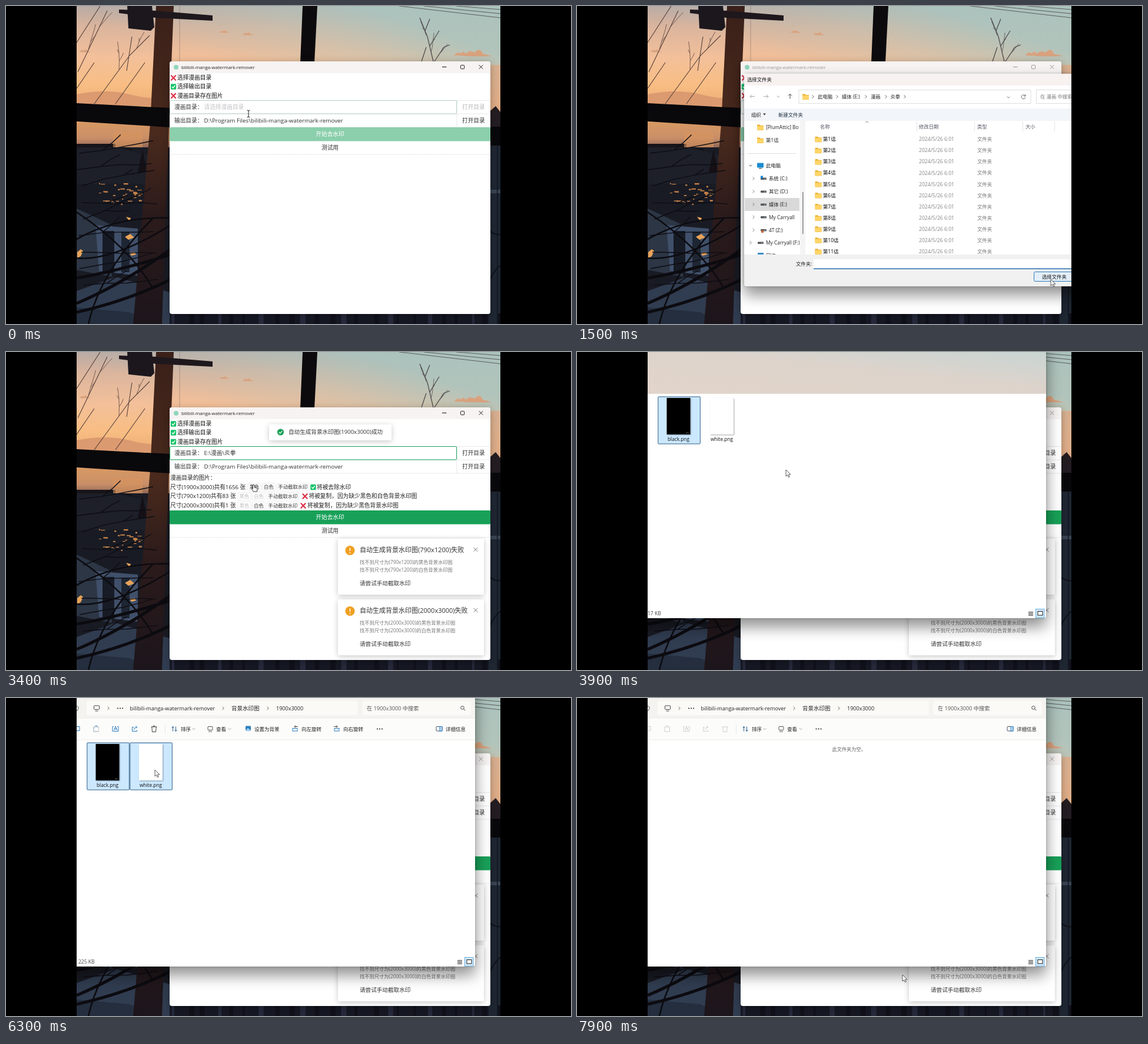
Recreate the animation shown at these times as an HTML page. Size 960 px wide and 540 px high, loop 8000 ms.

```html
<!DOCTYPE html>
<html lang="zh-CN">
<head>
<meta charset="utf-8">
<style>
html,body{margin:0;width:100%;height:100%;overflow:hidden;background:#000}
svg{display:block;width:960px;height:540px}
text{font-family:"Open Sans","Noto Sans CJK SC","Noto Sans CJK",sans-serif;white-space:pre}
.win{filter:drop-shadow(0 3px 7px rgba(0,0,0,.3))}
.pop{filter:drop-shadow(0 14px 13px rgba(0,0,0,.38)) drop-shadow(0 0 2px rgba(0,0,0,.25))}
.toast{filter:drop-shadow(0 2px 5px rgba(0,0,0,.22))}
</style>
</head>
<body>
<svg id="stage" viewBox="0 0 960 540"></svg>
<script>
const stage = document.getElementById('stage');
const PROJECT = 'bilibili-manga-watermark-remover';
const GREEN = '#18a058', BLUE = '#2b7cc0';

let seed = 11;
const rnd = () => (seed = (seed * 16807) % 2147483647) / 2147483647;
const range = (n, fn) => Array.from({ length: n }, (_, i) => fn(i)).join('');

// y is the vertical middle of the line
const text = (x, y, s, size = 9.7, fill = '#333', more = '') =>
  `<text x="${x}" y="${y + size * .36}" font-size="${size}" fill="${fill}" ${more}>${s}</text>`;
const mid = 'text-anchor="middle"';
const rect = (x, y, w, h, fill, more = '') =>
  `<rect x="${x}" y="${y}" width="${w}" height="${h}" fill="${fill}" ${more}/>`;
const line = (d, color, width = 1, more = '') =>
  `<path d="${d}" fill="none" stroke="${color}" stroke-width="${width}" ${more}/>`;
const shape = (d, fill, more = '') => `<path d="${d}" fill="${fill}" ${more}/>`;
const dot = (x, y, r, fill) => `<circle cx="${x}" cy="${y}" r="${r}" fill="${fill}"/>`;
const group = (id, body) => `<g id="${id}">${body}</g>`;
const gradient = (id, dir, stops) => `<linearGradient id="${id}" ${dir}>${stops.map(([o, c, a = 1]) =>
  `<stop offset="${o}" stop-color="${c}" stop-opacity="${a}"/>`).join('')}</linearGradient>`;
const down = 'x1="0" y1="0" x2="0" y2="1"';

const cross = (x, y) => line(`M${x - 3.6} ${y - 3.8}l7.2 7.6m0-7.6l-7.2 7.6`, '#dd2e44', 2.1, 'stroke-linecap="round"');
const tick = (x, y) => rect(x - 4.7, y - 4.7, 9.4, 9.4, '#16c46a', 'rx="1.5"') +
  line(`M${x - 2.6} ${y}l2 2.2 3.4-4.4`, '#fff', 1.4);
const chevron = (x, y, c = '#555') => line(`M${x - 1.5} ${y - 2.6}l2.8 2.6-2.8 2.6`, c, .9);
const caret = (x, y, c = '#666') => line(`M${x - 2.4} ${y - 1.2}l2.4 2.4 2.4-2.4`, c, .9);
const closeMark = (x, y, c) => line(`M${x - 3.3} ${y - 3.3}l6.6 6.6m0-6.6l-6.6 6.6`, c, 1);
const folder = (x, y) => shape(`M${x} ${y - 4.5}h4.5l1.5 1.5h5v8h-11z`, '#e9b53a') +
  rect(x, y - 2, 11, 6.5, '#ffd567', 'rx=".8"');

function twig(x, y, angle, len, depth) {
  if (!depth) return '';
  const bend = angle + (rnd() - .5) * .25;
  const x2 = x + Math.cos(bend) * len, y2 = y + Math.sin(bend) * len;
  return `M${x.toFixed(1)} ${y.toFixed(1)}L${x2.toFixed(1)} ${y2.toFixed(1)}` +
    twig(x2, y2, bend, len * .85, depth - 1) +
    (rnd() < .6 ? twig(x2, y2, bend + (rnd() < .5 ? -.45 : .45), len * .55, depth - 2 > 0 ? depth - 2 : 0) : '');
}
const twigs = list => list.map(a => twig(...a)).join('');

function wallpaper() {
  const cloud = (x, y, s) => shape(`M${x - 11 * s} ${y}q${4 * s} ${-6 * s} ${9 * s} ${-3 * s}q${5 * s} ${-5 * s} ${7 * s} ${s}l${8 * s} ${2 * s}q${-10 * s} 1 ${-24 * s} 0z`, '#d9a27e');
  const lamps = range(34, () => rect(158 + rnd() * 68, 300 + rnd() * 38, 2 + rnd() * 6, 1 + rnd() * 1.6, '#c9854a'));
  const sky = rect(120, 0, 720, 260, 'url(#sky)') + rect(120, 0, 720, 200, 'url(#teal)') +
    rect(820, 100, 20, 80, '#e3a884', 'opacity=".7"') +
    shape('M120 150q50-10 90 0t50 4v16H120z', '#dc9a70') +
    cloud(371, 45, .7) + cloud(411, 49, .8) + cloud(134, 78, .8) + cloud(800, 85, 2) + cloud(775, 84, 1.2) +
    line('M668 0L840 20M710 0L840 13M765 0L840 6', '#4a4446', .8) +
    line('M120 62L160 0M122 112L172 8M150 166L210 84L244 50M120 140L150 96M186 166L236 96M205 110L214 52', '#55403a', 1.1) +
    line(twigs([[140, 74, -1.3, 14, 4], [160, 34, -.8, 12, 3], [192, 108, -1.6, 15, 4], [222, 72, -1.1, 12, 3]]), '#5d463e', .8) +
    line('M726 94L716 52L703 20M720 68L736 42M728 94L744 70L754 66M712 42L720 22M706 94L714 70', '#4a4448', 1.2) +
    line(twigs([[714, 50, -1.9, 10, 3], [734, 84, -.9, 10, 3], [722, 80, -1.4, 11, 4]]), '#5a5256', .8) +
    shape('M823 178l9-8 8 10v30h-17z', '#241d22');
  const street = rect(120, 198, 160, 44, 'url(#dusk)') +
    rect(120, 240, 160, 300, '#191b24') + rect(278, 480, 562, 60, '#161824') + rect(820, 235, 20, 305, '#1f2733') +
    shape('M120 240h60l60 12v50H120z', '#1d1f29') + rect(120, 234, 66, 6, '#17141a') +
    shape('M182 214h50v26h-50z', '#d9955e', 'opacity=".6"') + shape('M224 282l8-38 8 38z', '#141016') +
    lamps + shape('M120 344l60 28v88l-60-12z', '#2c3645') + shape('M152 372l72 6v80l-66-8z', '#40506a') +
    rect(164, 382, 20, 72, '#171b26') + rect(196, 384, 14, 68, '#1e2634') +
    shape('M120 484l66-24 92 26v54H120z', '#303c50') + shape('M120 512l90 8 40 20H120z', '#242e3e') +
    shape('M202 392l9-5 7 6-10 4zM121 418l6-5 4 3-4 9-6 3zM210 419l9-1 2 4-8 2zM204 358l8 2-2 6z', '#e8a358');
  const frames = shape('M255 0h30l-8 200-12 340h-49l29-340z', 'url(#pole)') +
    line('M295 0V95', '#6a5553', 1, 'opacity=".4"') +
    shape('M192 6l62 2 97 8v9l-97-5-62-8z', '#1e181d') + shape('M206 0h42l4 36-6 6-38-4z', '#1b171d') +
    shape('M504 0h25l-5 96h-24z', '#0c0a0d') +
    shape('M120 165l158 8v33l-158-10zM820 205h20v32h-20z', '#09080b') +
    rect(823, 312, 17, 6, '#3a4554') + rect(834, 236, 1.5, 304, '#111620') +
    line('M820 380q10 10 20 8M820 470q8-20 20-30', '#10121a', 2) +
    range(24, i => rect(280 + i * 24 + rnd() * 10, 522, 3 + rnd() * 7, 18, i % 3 ? '#10111a' : '#262a3c'));
  const boughs = line('M120 520q90-20 160-56M120 505q80-34 160-92M120 462q70-12 160-40', '#0c0b10', 5) +
    line('M120 396q70-40 160-36M120 350q90 60 130 130M120 428q60 6 160-56M140 540q20-90 110-180', '#0c0b10', 2.6) +
    line(range(9, i => twig(120 + rnd() * 12, 250 + i * 28, -.5 + rnd() * .8, 40, 4)), '#0d0c12', 1.4);
  return sky + street + frames + boughs;
}

function appFrame() {
  const buttons = c => line('M741 103.5h7.5', c, 1.1) + rect(772.5, 100.5, 6.2, 6.2, 'none', `stroke="${c}" rx="1"`) + closeMark(807, 103.5, c);
  return `<g class="win">${rect(278, 94, 545, 429, '#fff', 'rx="4"')}</g>` +
    shape('M278 114v-16q0-4 4-4h537q4 0 4 4v16z', '#f6f3f2') + dot(289, 104, 4, '#8fd6bb') +
    group('titleOn', text(298, 103.7, PROJECT, 7.83, '#222') + buttons('#222')) +
    group('titleOff', text(298, 103.7, PROJECT, 7.83, '#9a9a9a') + buttons('#9b9b9b'));
}

function appBody(loaded) {
  const mark = loaded ? tick : cross, top = loaded ? 269 : 206;
  return mark(284.5, 122) + text(291, 121.8, '选择漫画目录', 9.7, '#111') +
    tick(284.5, 137) + text(291, 136.8, '选择输出目录', 9.7, '#111') +
    mark(284.5, 152.5) + text(291, 152.3, '漫画目录存在图片', 9.7, '#111') +
    line('M278 183.2H823M278 206H823M766 160V206M766 160.4H823', '#e3e3e8', .8) +
    rect(278.6, 160.5, 487, 22.4, '#fff', `stroke="${loaded ? GREEN : '#b4cfc9'}" rx="1.5"`) +
    text(286, 171.5, '漫画目录：') + text(336.5, 171.5, loaded ? 'E:\\漫画\\炎拳' : '请选择漫画目录', 9.7, loaded ? '#333' : '#c2c2c6') +
    text(775, 171.5, '打开目录', 9.7, loaded ? '#333' : '#b9b9bd') +
    text(286, 194.6, '输出目录：') + text(336.5, 194.4, `D:\\Program Files\\${PROJECT}`, 9.85) + text(775, 194.6, '打开目录') +
    rect(278, top, 545, 23.5, loaded ? GREEN : '#8bcfac', 'rx="1.5"') + text(550.5, top + 11.5, '开始去水印', 9.7, '#fff', mid) +
    text(550.5, top + 34.7, '测试用', 9.7, '#333', mid) + line(`M278 ${top + 46}H823`, '#dcdce0', .8, 'stroke-dasharray="2 1"');
}

function sizeRows() {
  const chip = (x, y, w, s, c) => rect(x - w / 2, y - 6.5, w, 13, '#fff', 'stroke="#e6e6ea" stroke-width=".8" rx="1.5"') + text(x, y, s, 8.3, c, mid);
  const row = (y, label, x, black, white) => text(279, y, label, 9.7, '#222') +
    chip(x, y, 22, '黑色', black) + chip(x + 24.5, y, 22, '白色', white) + chip(x + 65.5, y, 54, '手动截取水印', '#333');
  const off = '#bcbcc0', on = '#333', missing = '将被复制，因为缺少黑色和白色背景水印图';
  return text(279, 214, '漫画目录的图片：', 9.7, '#222') +
    row(229.5, '尺寸(1900x3000)共有1656 张', 422, off, off) +
    group('rowReady', chip(422, 229.5, 22, '黑色', on) + chip(446.5, 229.5, 22, '白色', on)) +
    group('rowTodo', cross(522, 229.5) + text(528, 229.5, missing)) +
    group('rowDone', tick(522, 229.5) + text(528, 229.5, '将被去除水印', 9.7, '#222')) +
    row(245, '尺寸(790x1200)共有83 张', 405, off, off) + cross(508, 245) + text(514.5, 245, missing, 9.7, '#222') +
    row(261, '尺寸(2000x3000)共有1 张', 405, off, on) + cross(505, 261) + text(512, 261, '将被复制，因为缺少黑色背景水印图', 9.7, '#222');
}

function notice(id, size) {
  return group(id, `<g class="toast">${rect(0, 0, 248, 95, '#fff', 'rx="2"')}</g>` + dot(20.5, 20, 8, '#f0a020') +
    line('M20.5 15.5v5.5M20.5 23v1.8', '#fff', 1.5) + text(37, 19, `自动生成背景水印图(${size})失败`, 11) +
    closeMark(234, 18.5, '#777') + text(37, 40.5, `找不到尺寸为(${size})的黑色背景水印图`, 8.25, '#777') +
    text(37, 53.5, `找不到尺寸为(${size})的白色背景水印图`, 8.25, '#777') + text(37, 76, '请尝试手动截取水印', 9.6));
}

const messages = () =>
  group('loading', `<g class="toast">${rect(477, 123, 146, 26, '#fff', 'rx="2"')}</g>` +
    group('spinner', line('M0-4.5A4.5 4.5 0 0 1 0 4.5', GREEN, 1.2)) + text(510, 136, '尝试自动生成背景水印图', 9.1)) +
  group('success', `<g class="toast">${rect(447, -13, 208, 27, '#fff', 'rx="2"')}</g>` + dot(466.5, 0, 5.6, GREEN) +
    line('M463.8 0l2 2.2 3.6-4', '#fff', 1.2) + text(480, 0, '自动生成背景水印图(1900x3000)成功', 9.6));

function picker() {
  const t = (x, y, s, c = '#222') => text(x, y, s, 8.4, c);
  const drive = (x, y) => rect(x, y - 1.5, 10, 3.6, '#555', 'rx="1"') + rect(x + 6, y, 2.5, 1, '#9cf');
  const side = (x, y, s) => chevron(x - 26, y, '#777') + drive(x - 14, y) + t(x, y, s);
  const row = (y, name) => folder(404.5, y) + t(418, y, name, '#000') + text(581, y, '2024/5/26 6:01', 8.6, '#858585') + t(680, y, '文件夹', '#777');
  return `<g class="pop">${rect(284, 115, 600, 361, '#fff', 'rx="4"')}</g>` +
    rect(284, 115, 560, 20, '#f7f1f0') + t(289, 124.5, '选择文件夹', '#111') +
    line('M302 153.5h-8m3-3l-3 3 3 3M317 153.5h8m-3-3l3 3-3 3', '#aaa') + caret(342, 154, '#999') + line('M362 157.5v-8m-3 3l3-3 3 3', '#444') +
    rect(377, 142.5, 394, 23, '#fff', 'stroke="#dedede"') + folder(383, 154) +
    chevron(401, 154) + t(409, 154, '此电脑') + chevron(442, 154) + t(450, 154, '媒体 (E:)') + chevron(491, 154) + t(499, 154, '漫画') +
    chevron(525, 154) + t(532.5, 154, '炎拳') + chevron(557, 154) + caret(733, 155) + line('M761.5 152.5a3.4 3.4 0 1 0 .5 2.5m0-5v3h-3', '#666') +
    rect(780.5, 142.5, 80, 23, '#fff', 'stroke="#dedede"') + t(787, 154, '在 漫画 中搜索', '#777') +
    rect(284, 174, 560, 21, '#f2f5f9') + t(296, 184.5, '组织') + shape('M316 182.5h5l-2.5 3z', '#333') + t(342, 184.5, '新建文件夹', '#234') +
    `<g clip-path="url(#sideClip)">` + folder(306, 206) + t(321, 206, '[PlumAttic] Bo') + folder(306, 228) + t(321, 228, '第1话') +
    line('M290 250.5h82', '#ddd') + caret(295, 271, '#333') + rect(306, 266.5, 11, 8, '#1b8bd0', 'rx="1"') + rect(309, 275, 5, 1.5, '#777') + t(321, 271, '此电脑') +
    rect(285, 326, 93, 22, '#d9d9d9') + side(326, 293, '系统 (C:)') + rect(312, 288.5, 4, 4, '#1685d8') + side(326, 315, '其它 (D:)') + side(326, 337, '媒体 (E:)') +
    side(326, 358.5, 'My Carryall') + side(326, 380.5, '4T (Z:)') + rect(313, 381, 4, 4, '#c46a35') + side(321, 402, 'My Carryall (F:)') +
    rect(307, 419, 10, 7, '#3b8fc4') + t(321, 424, '网络') + '</g>' +
    rect(379, 195, 9, 227, '#f4f4f4') + rect(383, 316, 1.6, 71, '#888') +
    line('M490 198l2.7-2.2 2.7 2.2', '#777', .9) + line('M577.5 196v17M675.5 196v17M757.5 196v17M811.5 196v17', '#e4e4e4') +
    [[413, '名称'], [581, '修改日期'], [680, '类型'], [762, '大小']].map(([x, s]) => t(x, 204.5, s, '#556')).join('') +
    range(11, i => row(226.3 + i * 19.05, `第${i + 1}话`)) +
    shape('M284 422h556v54H288q-4 0-4-4z', '#f1f1f1') + t(372, 438, '文件夹:') + rect(402, 430, 440, 16, '#fff') + line('M402 446.3h440', '#2b6cb0', 1.4) +
    rect(776.5, 451.5, 80, 16, '#e3effa', 'stroke="#3079b8" rx="2"') + text(790, 459.5, '选择文件夹', 8.4, '#111');
}

function explorer() {
  const t = (x, y, s, c = '#222', size = 8.5, more = '') => text(x, y, s, size, c, more);
  const tools = c => line('M116 48.5h9v7h-9zM149 49h8.5v8h-8.5zm2.5-1.8h3.5M183 48.5h-2v8h10v-8h-2M183.5 55l2.7-7 2.7 7m-4.5-2.5h3.6M217 49.5h-2.5v7h8v-2M217.5 54q0-4.5 5-4.5m-2-2.2l2.2 2.2-2.2 2.2', c);
  const thumb = (x, fill, name) => rect(x - 20, 78, 40, 62, fill, 'style="filter:drop-shadow(1px 1px 1px rgba(0,0,0,.35))"') + t(x, 148, name, '#111', 8.3, mid);
  const pick = x => rect(x, 76, 71.5, 80, '#cce8ff', 'stroke="#2f5f85" rx="1"');
  const turn = (x, s) => rect(x - 4, 51.5, 8, 4.5, 'none', `stroke="${BLUE}"`) + line(`M${x + s * 5} 48.5h${-s * 6}m${s * 2}-2l${-s * 2} 2 ${s * 2} 2`, '#444');
  const dots = (x, y) => dot(x - 4, y, 1.1, '#333') + dot(x, y, 1.1, '#333') + dot(x + 4, y, 1.1, '#333');
  return `<g class="pop"><rect id="sheet" x="90" y="-20" width="707" height="476" fill="#fff" rx="4"/></g>` +
    rect(120, 0, 677, 71, 'url(#mica)') +
    group('chrome', rect(120, 0, 677, 34, '#f4f3ef') + rect(137, 5, 461, 24, '#fbfaf6', 'rx="3"') + rect(605, 5, 185, 24, '#fbfaf6', 'rx="3"') +
      rect(120, 34, 677, 37, '#fcfcfb') + line('M120 34h677M120 71h677', '#e6e6e4', .8) + line('M120 14q4 0 3 4t-4 4', '#555') +
      rect(149.5, 13, 9, 6.5, 'none', 'stroke="#444" rx="1"') + line('M151.5 22h5', '#444') + chevron(174, 17.5) + dots(194, 17.5) +
      t(210.5, 17.5, PROJECT, '#222', 9.08) + chevron(369, 17.5) + t(383, 17.5, '背景水印图', '#222', 9.5) + chevron(445, 17.5) + t(459, 17.5, '1900x3000', '#222', 9.05) +
      t(613, 17.5, '在 1900x3000 中搜索', '#555', 9.2) + `<circle cx="775.5" cy="16.5" r="2.8" fill="none" stroke="#444"/>` + line('M777.5 18.5l2.8 2.8', '#444') +
      line('M283.5 56.5v-8m-2 2l2-2 2 2M288.5 48.5v8m-2-2l2 2 2-2', '#2a5f8f') + t(297, 52.5, '排序') + caret(319, 52.5, '#999') +
      rect(343, 48.5, 8, 6, 'none', 'stroke="#555" rx="1"') + line('M344 57h6', '#555') + t(357, 52.5, '查看') + caret(380, 52.5, '#999') + line('M270.5 44v17', '#e8e8e8') +
      rect(731, 48.5, 10, 7.5, 'none', 'stroke="#456" rx="1"') + rect(737, 48.5, 4, 7.5, '#bfe0f5', `stroke="${BLUE}"`) + t(747, 52.5, '详细信息') +
      group('toolsOn', tools(BLUE) + line('M149 49h8.5v8h-8.5z', '#d6d6d6', 1.4) + line('M246.5 49h10m-8.7 0l.7 8.5h6l.7-8.5m-5.2 0v-1.5h3V49', '#444') +
        rect(407, 47.5, 9, 8, '#2c7fbd', 'rx="1"') + shape('M407 55l4-4 5 4z', '#9fd3f4') + t(422, 52.5, '设置为背景') +
        turn(491, 1) + t(502, 52.5, '向左旋转') + turn(562, -1) + t(573, 52.5, '向右旋转') + dots(635, 52.5)) +
      group('toolsOff', tools('#cfcfcf') + line('M246.5 49h10m-8.7 0l.7 8.5h6l.7-8.5', '#cfcfcf') + dots(410.5, 52.5))) +
    group('files', pick(137.8) + group('pickWhite', pick(210.8)) + thumb(172.5, '#000', 'black.png') + rect(185, 137, 5, .8, '#777') + thumb(246, '#fff', 'white.png')) +
    group('empty', t(433.5, 87.5, '此文件夹为空。', '#666', 8.2)) +
    group('status', group('kbOne', t(120, 448, '17 KB', '#444')) + group('kbTwo', t(123, 448, '225 KB', '#444')) +
      line('M767 445.5h8m-8 2h8m-8 2h8m-8 2h8', '#444') + rect(779.5, 440.5, 14.5, 15, '#cfe6f7', 'stroke="#6aaede"') + rect(783, 444.5, 8, 6.5, '#fff', 'stroke="#222"'));
}

function contextMenu() {
  const items = '打开(O),设置为背景,编辑(E),打印(P),向右旋转,向左旋转,打开方式(H),授予访问权限(G),还原以前的版本(V),发送到(N),剪切(T),复制(C),创建快捷方式(S)'.split(',');
  return group('menu', `<g class="toast">${rect(251, 130, 223, 420, '#f0f0f0', 'stroke="#c8c8c8"')}</g>` + items.map((s, i) => text(274.5, 144 + i * 30, s, 8.3, '#222')).join('')) +
    group('remove', rect(251, 527, 223, 16, '#d6d6d8') + text(274.5, 535, '删除(D)', 8.3, '#222'));
}

const cursors = {
  ibeam: line('M-2.5-6q2.5 0 2.5 1.5 0-1.5 2.5-1.5M0-5v10M-2.5 6Q0 6 0 4.5 0 6 2.5 6', '#222', 1),
  arrow: shape('M0 0v11l2.6-2.3 1.8 4 1.8-.8-1.8-3.9h3.6z', '#fff', 'stroke="#333" stroke-width=".8"'),
  hand: shape('M-1.5-5q1.5-2 2.7 0v4l5 1.5-.7 5.5h-6l-3.5-5q1-1.5 2.5.5z', '#fff', 'stroke="#222" stroke-width=".9"'),
  ban: '<circle r="4.5" fill="#fff" stroke="#c22f38" stroke-width="1.7"/>' + line('M-3.2-3.2l6.4 6.4', '#c22f38', 1.6)
};
const names = Object.keys(cursors);

stage.innerHTML = `<defs>
  ${gradient('sky', down, [[0, '#b9aaa4'], [.14, '#dbb59d'], [.34, '#f3c09a'], [.52, '#f8bd82'], [1, '#c9875c']])}
  ${gradient('teal', 'x1=".2" y1=".6" x2=".8" y2=".1"', [[.25, '#a9c3bd', 0], [.6, '#b6c6bd', .4], [.95, '#a9c5c0', .88]])}
  ${gradient('dusk', down, [[0, '#d79863'], [.6, '#c98f68'], [1, '#8a6355']])}
  ${gradient('pole', down, [[0, '#3a2019'], [.4, '#4a2a1d'], [.65, '#2c1b1b'], [1, '#1c151b']])}
  ${gradient('mica', 'x1="0" y1="1" x2="1" y2="0"', [[0, '#e2d5ca'], [.55, '#ddd3cb'], [1, '#c9d5d3']])}
  <clipPath id="view"><rect x="120" width="720" height="540"/></clipPath>
  <clipPath id="sideClip"><rect x="284" y="195" width="94.5" height="227"/></clipPath>
  <clipPath id="appClip"><rect x="278" y="94" width="545" height="429" rx="4"/></clipPath>
</defs><rect width="960" height="540"/><g clip-path="url(#view)">` + wallpaper() + appFrame() +
  group('fresh', appBody(false)) + group('loaded', appBody(true) + sizeRows()) +
  `<g clip-path="url(#appClip)">${notice('noticeB', '2000x3000') + notice('noticeA', '790x1200') + messages()}</g>` +
  group('picker', picker()) + group('explorer', explorer()) + contextMenu() +
  group('cursor', names.map(n => group(n, cursors[n])).join('')) + '</g>';

const nodes = {};
stage.querySelectorAll('g[id],#sheet').forEach(n => nodes[n.id] = n);
const fade = (id, o) => {
  nodes[id].style.display = o > 0 ? '' : 'none';
  nodes[id].setAttribute('opacity', Math.min(1, +o));
};
const move = (id, x, y, more = '') => nodes[id].setAttribute('transform', `translate(${x} ${y})${more}`);
const ramp = (t, start, length) => Math.max(0, Math.min(1, (t - start) / length));
const easeOut = p => 1 - (1 - p) ** 2.5;
const smooth = p => p * p * (3 - 2 * p);

const path = [
  [0, 412, 183, 'ibeam'], [400, 412, 183, 'ibeam'], [600, 440, 215, 'arrow'], [1400, 805, 464, 'arrow'], [1800, 805, 464, 'arrow'],
  [2200, 440, 239, 'ban'], [2500, 438, 237, 'ban'], [2800, 421, 231, 'hand'], [3500, 421, 231, 'arrow'], [3800, 355, 200, 'arrow'],
  [4600, 355, 200, 'arrow'], [5300, 198, 206, 'arrow'], [5600, 198, 206, 'arrow'], [6000, 253, 122, 'arrow'], [6500, 253, 122, 'arrow'],
  [7000, 306, 525, 'hand'], [7200, 306, 525, 'arrow'], [7700, 553, 470, 'arrow'], [8000, 553, 470, 'arrow']
];

function drawCursor(t) {
  const i = path.findIndex((k, n) => t >= k[0] && t < path[n + 1][0]);
  const [a, b] = [path[i], path[i + 1]], p = smooth(ramp(t, a[0], b[0] - a[0]));
  move('cursor', a[1] + (b[1] - a[1]) * p, a[2] + (b[2] - a[2]) * p);
  names.forEach(n => fade(n, n === a[3]));
}

function draw(t) {
  const loaded = t >= 1900, opened = t >= 3600, gone = t >= 7400;
  const active = t < 500 || loaded && !opened;
  fade('titleOn', active); fade('titleOff', !active);
  fade('fresh', !loaded); fade('loaded', loaded);
  fade('rowTodo', t < 2200); fade('rowDone', t >= 2200); fade('rowReady', ramp(t, 2300, 200));

  const dialog = ramp(t, 400, 200) * (1 - ramp(t, 1700, 200));
  fade('picker', dialog);
  move('picker', 560 * .04 * (1 - dialog), 295 * .04 * (1 - dialog), ` scale(${.96 + .04 * dialog})`);

  fade('loading', ramp(t, 1800, 200) * (1 - ramp(t, 2200, 200)));
  move('spinner', 498, 136, ` rotate(${t * .36 - 870})`);
  fade('success', ramp(t, 2100, 200) * (1 - ramp(t, 5200, 200)));
  move('success', 0, 160 - 24 * easeOut(ramp(t, 2300, 300)));
  const inA = easeOut(ramp(t, 2100, 300)), inB = easeOut(ramp(t, 2200, 300));
  fade('noticeA', inA); fade('noticeB', inB * inB);
  move('noticeA', 564 + 268 * (1 - inA), 420 - 103 * easeOut(ramp(t, 2260, 300)));
  move('noticeB', 564 + 290 * (1 - inB), 420);

  const ready = t >= 4000;
  fade('explorer', ramp(t, 3500, 200));
  nodes.sheet.setAttribute('height', ready ? 476 : 472);
  move('status', 0, ready ? 0 : -4);
  fade('chrome', ready);
  fade('toolsOn', !gone); fade('toolsOff', gone);
  fade('files', !gone); fade('empty', gone);
  const both = t >= 6100;
  fade('pickWhite', both); fade('kbOne', !both); fade('kbTwo', both && !gone);

  fade('menu', t >= 6500 && t < 7100);
  fade('remove', t >= 6500 && t < 7200 ? (t < 7100 ? 1 : .85) : 0);
  drawCursor(t);
}

let start = null;
function step(now) {
  start ??= now;
  draw(Math.floor(((now - start) % 8000) / 100) * 100);
  requestAnimationFrame(step);
}
draw(0);
requestAnimationFrame(step);
</script>
</body>
</html>
```
